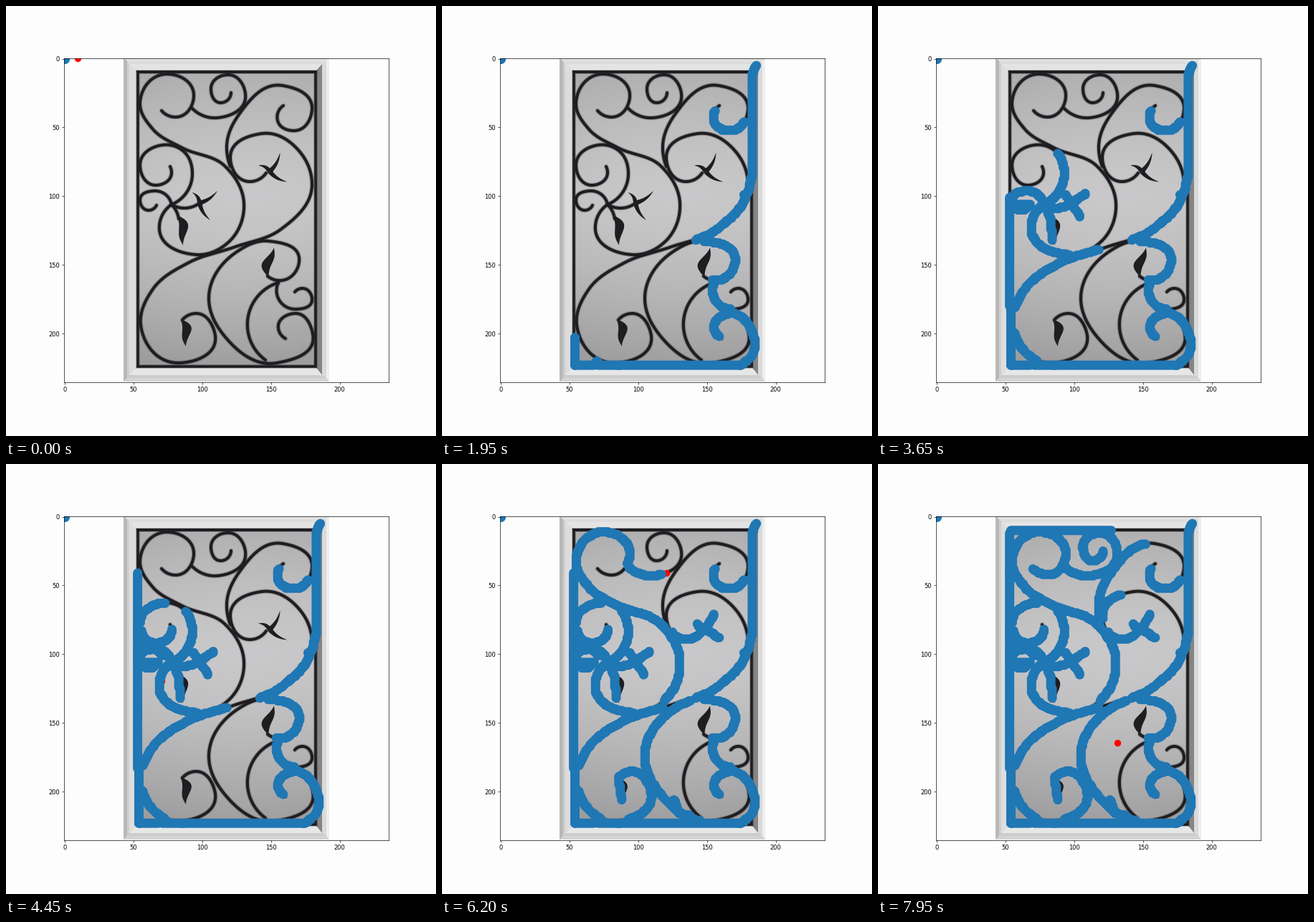
Recreate the animation shown at these times as a matplotlib script. Size 600 by 600 pixels, loop 8 s.

```python
import numpy as np
import matplotlib.pyplot as plt
from matplotlib.animation import FuncAnimation
from matplotlib.patches import Polygon, Rectangle

SIZE, DPI, FRAMES = 600, 60, 160
PT = 72 / DPI                       # points per pixel
BOX = (81.0, 72.6, 452.6)           # plot area: left, top, side
CELL = BOX[2] / 236                 # pixels per data unit
PAPER, IRON, BLUE = "#fefdfe", "#1f1d20", "#1f77b4"
LAG = 3                             # paint trails the robot by this many samples


def bend(*keys, n=24):
    """Smooth curve whose tangents follow the circle through neighbouring keys."""
    p = np.array(keys, float)
    d = np.diff(p, axis=0)
    w = d / (d**2).sum(1)[:, None]
    tan = np.vstack([p[:1], w[:-1] + w[1:], p[:1]])
    unit = lambda v: v / np.hypot(*v)
    mirror = lambda v, axis: 2 * axis * (v @ axis) - v
    tan[0] = mirror(tan[1], unit(d[0]))
    tan[-1] = mirror(tan[-2], unit(d[-1]))
    t = np.linspace(0, 1, n)[:, None]
    out = []
    for a, b, u, v in zip(p, p[1:], map(unit, tan), map(unit, tan[1:])):
        c = np.hypot(*(b - a))
        ha, hb = (2 * c / (3 * (1 + k @ (b - a) / c)) for k in (u, v))
        out.append((1 - t)**3 * a + 3 * t * (1 - t)**2 * (a + ha * u)
                   + 3 * t**2 * (1 - t) * (b - hb * v) + t**3 * b)
    return np.vstack(out)


def part(curve, start, end):
    """Piece of a curve between the points nearest to start and end."""
    i, j = (int(np.argmin(np.hypot(*(curve - q).T))) for q in (start, end))
    return curve[i:j + 1] if i <= j else curve[j:i + 1][::-1]


def ribbon(p, q, width, sway):
    """Filled outline along p-q with a width and a sideways sway over t."""
    p, q = np.array(p, float), np.array(q, float)
    t = np.linspace(0, 1, 30)
    side = np.array([p[1] - q[1], q[0] - p[0]]) / np.hypot(*(q - p))
    mid = p + t[:, None] * (q - p) + sway(t)[:, None] * side
    off = width(t)[:, None] * side / 2
    return np.vstack([mid + off, (mid - off)[::-1]])


def leaf(p, q):
    return ribbon(p, q, lambda t: 13 * np.sin(np.pi * t**0.8)**1.2,
                  lambda t: -4.5 * np.sin(np.pi * t) - 2.5 * np.sin(2 * np.pi * t))


def flower_tips(center, turn):
    angle = np.radians(np.array([-34, 58, -124]) + turn)
    reach = np.array([[30], [28], [18]])
    return np.array(center) + reach * np.c_[np.cos(angle), np.sin(angle)]


# Wrought iron scrolls, in stage pixels
scroll = bend((217, 146), (236, 155), (262, 127), (225, 95), (187, 135),
              (205, 172), (246, 198), (305, 223), (332, 275), (310, 330),
              (265, 347), (214, 306), (231, 277))
loop = bend((231, 277), (260, 235), (248, 203), (218, 194), (187, 222),
            (211, 250), (231, 233), (229, 224))
link = bend((260, 143), (295, 156), (334, 122), (310, 96), (286, 116),
            (300, 135), (314, 121))
arch = bend((387, 139), (379, 160), (402, 174), (427, 145), (386, 111),
            (326, 150), (308, 195), (313, 224))
sweep = bend((363, 233), (340, 245), (313, 213), (357, 178), (412, 206),
             (427, 250), (383, 312), (320, 336), (255, 358), (205, 395),
             (188, 445), (240, 498), (291, 455), (264, 429), (246, 438))
base = bend((365, 377), (380, 383), (409, 357), (366, 328), (322, 343),
            (283, 408), (306, 462), (378, 498), (428, 457), (402, 429),
            (380, 450), (390, 464))
belly = bend((380, 386), (337, 440), (362, 494))
tendril = bend((380, 386), (403, 423), (427, 408), (414, 394), (403, 399))
curl = bend((231, 277), (207, 258), (187, 271), (200, 285), (210, 278))
stem = bend((231, 277), (250, 282), (270, 275))
twig = bend((231, 277), (237, 285), (241, 297))
bars = [scroll, loop, link, arch, sweep, base, belly, tendril, curl, stem, twig]

leaves = [((239, 292), (247, 334)), ((244, 437), (251, 475)), ((366, 378), (374, 337))]
flowers = [((270, 275), 0), ((368, 231), -27)]


def cross(center, turn):
    """Painted cross over a flower."""
    a, b, c = np.array(center) + 0.8 * (flower_tips(center, turn) - center)
    return [[center, a], [c, b]]


def upright(x, y0, y1):
    return [(x, y0), (x, y1)]


# The walk: (frame reached, painted strokes); gaps are crossed unpainted
walk = [
    (18, [[(438, 84), (433, 96), (433, 165)],
          part(arch, (422, 163), (381, 147)),
          [(433, 165), (433, 235), (428, 258), (422, 264)]]),
    (34, [part(sweep, (425, 262), (355, 326)),
          part(base, (366, 328), (378, 383)),
          part(tendril, (380, 386), (402, 423)),
          part(base, (402, 429), (386, 461)),
          bend((405, 427), (431, 450), (432, 488), (415, 501)),
          [(415, 501), (247, 501)]]),
    (39, [[(247, 501), (219, 501), (216, 494), (213, 501), (185, 501)],
          upright(185, 501, 462), upright(185, 462, 475)]),
    (51, [upright(186, 462, 425),
          part(sweep, (189, 455), (222, 495)),
          part(sweep, (191, 420), (308, 338)),
          part(scroll, (268, 347), (214, 300))]),
    (73, [part(scroll, (214, 300), (231, 277)),
          [(232, 278), (240, 295), (244, 327)],
          stem, *cross(*flowers[0]),
          part(loop, (231, 277), (252, 206)),
          curl, [(192, 277), (213, 277)],
          upright(183, 268, 425)]),
    (103, [upright(183, 268, 235),
           part(loop, (188, 234), (231, 230)),
           [(188, 245), (222, 268)],
           part(loop, (187, 222), (222, 194)),
           upright(183, 235, 152),
           part(sweep, (262, 495), (246, 438)),
           [(246, 438), (251, 468)],
           [(345, 490), (331, 488), (324, 469)],
           part(base, (360, 494), (283, 403))]),
    (119, [part(base, (283, 403), (346, 332)),
           part(scroll, (310, 330), (318, 237)),
           part(sweep, (322, 236), (363, 233)),
           *cross(*flowers[1]),
           part(scroll, (318, 237), (187, 133))]),
    (124, [part(scroll, (187, 133), (261, 140)),
           part(link, (260, 143), (314, 152))]),
    (153, [part(link, (314, 152), (314, 121)),
           part(scroll, (258, 143), (217, 146)),
           upright(183, 152, 97),
           [(186, 93), (325, 93)],
           part(arch, (325, 152), (372, 115)),
           part(arch, (325, 152), (310, 214)),
           part(sweep, (313, 215), (337, 182))]),
    (159, [[(334, 389)]]),
]


def resample(pts, step=2.0):
    p = np.array(pts, float)
    if len(p) < 2:
        return p
    s = np.r_[0, np.cumsum(np.hypot(*np.diff(p, axis=0).T))]
    t = np.linspace(0, s[-1], max(2, int(s[-1] / step) + 1))
    return np.c_[np.interp(t, s, p[:, 0]), np.interp(t, s, p[:, 1])]


def build_walk():
    pos, pen = [np.array([[99.5, 73.0]])], [np.array([False])]
    keys, marks, total = [0], [0], 1
    for frame, strokes in walk:
        for stroke in strokes:
            line = resample(stroke)
            hop = resample([pos[-1][-1], line[0]])
            pos += [hop, line]
            pen += [np.zeros(len(hop), bool), np.ones(len(line), bool)]
            total += len(hop) + len(line)
        keys.append(frame)
        marks.append(total - 1)
    return np.vstack(pos), np.concatenate(pen), keys, marks


path, pen, keys, marks = build_walk()
origin = np.array(BOX[:2]) + CELL / 2
painted = np.round((path - origin) / CELL) * CELL + origin
painted[~pen] = np.nan

fig = plt.figure(figsize=(SIZE / DPI, SIZE / DPI), dpi=DPI, facecolor=PAPER)
art = fig.add_axes([0, 0, 1, 1])
art.axis("off")
clip = Rectangle(BOX[:2], BOX[2], BOX[2], transform=art.transData)


def poly(pts, color, zorder=1):
    art.add_patch(Polygon(pts, closed=True, facecolor=color, lw=0, zorder=zorder))


def corners(x0, y0, x1, y1):
    return [(x0, y0), (x1, y0), (x1, y1), (x0, y1)]


# Bevelled frame: nested rings with grey levels for top, right, bottom, left
rects = [corners(164, 73, 451, 524), corners(169, 77, 447, 519),
         corners(172, 81, 441, 515), corners(182, 90, 433, 505)]
greys = [(226, 238, 212, 184), (220, 218, 204, 206), (228, 133, 231, 221)]
poly(rects[0], "#dcdcde")
for outer, inner, levels in zip(rects, rects[1:], greys):
    for k, level in enumerate(levels):
        m = (k + 1) % 4
        poly([outer[k], outer[m], inner[m], inner[k]], [level / 255] * 3)

# Softly lit panel
v, u = np.mgrid[0:1:120j, 0:1:80j]
glow = 201 - 24 * np.clip((0.42 - v) / 0.42, 0, 1)**1.5
glow -= 42 * np.clip((v - 0.42) / 0.58, 0, 1)**1.5 + 14 * (u - 0.6)**2
panel = np.stack([glow, glow - 1, glow + 0.5], -1) / 255
art.imshow(panel, extent=(182, 433, 505, 90), aspect="auto",
           interpolation="bilinear", zorder=1.1)

rim = corners(184, 92, 431.5, 503)
rim = np.array(rim + rim[:2])
for width, alpha in ((6.5, 0.25), (4.1, 1)):
    for c in bars:
        art.plot(*c.T, color=IRON, lw=width * PT, alpha=alpha,
                 solid_capstyle="round", zorder=2)
    art.plot(*rim.T, color=IRON, lw=(width - 0.5) * PT, alpha=alpha,
             solid_joinstyle="miter", zorder=2)
for ends in leaves:
    poly(leaf(*ends), IRON, 2)
for center, turn in flowers:
    for tip in flower_tips(center, turn):
        poly(ribbon(center, tip, lambda t: 7 * (1 - t)**0.8,
                    lambda t: 2.5 * np.sin(np.pi * t)), IRON, 2)

robot, = art.plot([], [], "o", color="red", ms=9.4 * PT, mew=0, zorder=3)
home, = art.plot(*origin, "o", color=BLUE, ms=13 * PT, mew=0, zorder=4)
trail, = art.plot([], [], color=BLUE, lw=13 * PT, solid_capstyle="round",
                  solid_joinstyle="round", zorder=4)
for item in (robot, home, trail):
    item.set_clip_path(clip)
art.set_xlim(0, SIZE)
art.set_ylim(SIZE, 0)

# Axes with ticks above the picture
ax = fig.add_axes([BOX[0] / SIZE, 1 - (BOX[1] + BOX[2]) / SIZE,
                   BOX[2] / SIZE, BOX[2] / SIZE], facecolor="none")
ax.set_xlim(-0.5, 235.5)
ax.set_ylim(235.5, -0.5)
ax.set_xticks(range(0, 201, 50))
ax.set_yticks(range(0, 201, 50))


def update(frame):
    i = int(round(np.interp(frame, keys, marks)))
    robot.set_data([path[i, 0]], [path[i, 1]])
    done = painted[:max(i - LAG + 1, 0)]
    trail.set_data(done[:, 0], done[:, 1])
    return robot, trail


anim = FuncAnimation(fig, update, frames=FRAMES, interval=50, repeat=True,
                     repeat_delay=0, blit=False)
plt.show()
```
